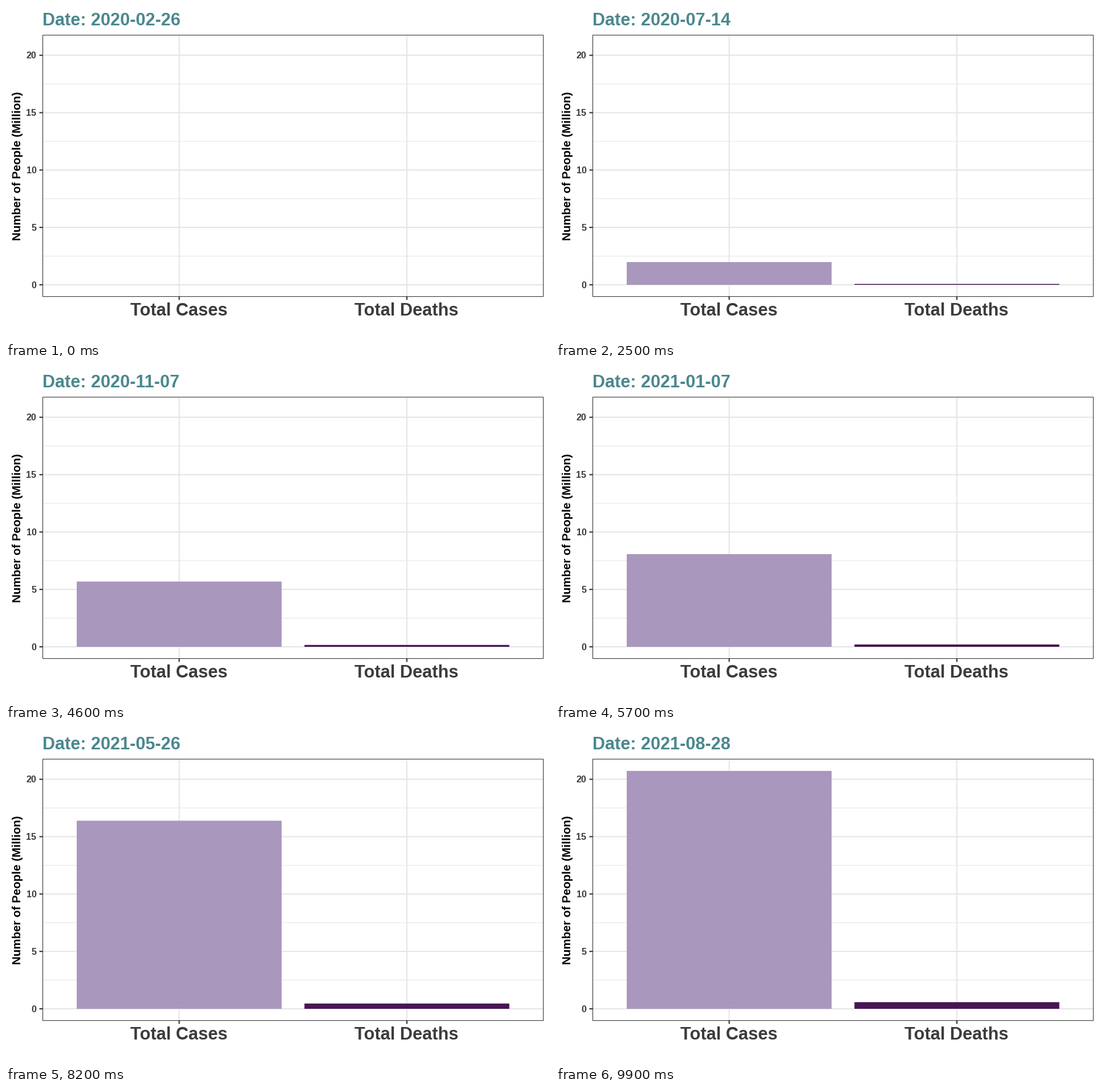
Recreate the animation shown at these times as a matplotlib script. Size 954 px wide and 587 px high, loop 10 s.

```python
import matplotlib.pyplot as plt
import numpy as np
from matplotlib.animation import FuncAnimation
from matplotlib.patches import Rectangle

W, H, DPI = 954, 587, 64
PT = 72 / DPI  # points per pixel
FRAMES, LOOP = 100, 10000

LEFT, RIGHT, TOP, BOTTOM = 64.5, 942.3, 51.2, 510.6
ZERO, UNIT = 490.0, 20.17
CENTERS, BAR_W = (303.7, 703.0), 359.3
GRID, INK, LABEL = "#E6E6E6", "#333333", "#3C3C3C"

START = np.datetime64("2020-02-26")
LAST_DAY = 549
LEAD = 2  # the bars run slightly ahead of the date

# Cases in millions on the 10th, 20th and last day of each month
CASES = [
    0, 0.001, 0.006, 0.020, 0.041, 0.087, 0.163, 0.285, 0.512,
    0.772, 1.068, 1.402, 1.801, 2.119, 2.662, 3.057, 3.502, 3.990,
    4.270, 4.545, 4.811, 5.083, 5.274, 5.536, 5.700, 6.020, 6.336,
    6.782, 7.239, 7.676, 8.115, 8.638, 9.205, 9.659, 10.139, 10.551,
    11.202, 11.950, 12.749, 13.445, 14.043, 14.659, 15.210, 15.894, 16.600,
    17.211, 17.928, 18.557, 19.069, 19.419, 19.930, 20.213, 20.528, 20.806,
]
months = np.arange("2020-03", "2021-09", dtype="datetime64[M]")
first = months.astype("datetime64[D]")
last = (months + 1).astype("datetime64[D]") - 1
CASE_DAYS = (np.stack([first + 9, first + 19, last], 1).ravel() - START).astype(int)

DEATH_DAYS = [20, 45, 64, 89, 110, 140, 170, 189, 230, 270, 310,
              350, 372, 385, 400, 415, 430, 455, 480, 510, 549]
DEATHS = [0, .001, .006, .0245, .043, .073, .107, .125, .153, .168, .196,
          .232, .260, .285, .325, .375, .410, .457, .505, .545, .579]

plt.rcParams["font.family"] = "Liberation Sans"
plt.rcParams["font.weight"] = "bold"

fig = plt.figure(figsize=(W / DPI, H / DPI), dpi=DPI, facecolor="white")
ax = fig.add_axes([0, 0, 1, 1])
ax.set_xlim(0, W)
ax.set_ylim(H, 0)
ax.axis("off")


def line(x0, y0, x1, y1, color, width, z):
    ax.plot([x0, x1], [y0, y1], color=color, lw=width * PT, zorder=z,
            solid_capstyle="butt", snap=False)


def text(x, y, s, size, color, ha="center", **kw):
    return ax.text(x, y, s, fontsize=size * PT, color=color, ha=ha,
                   va="baseline", **kw)


def bar(center, color):
    return ax.add_patch(Rectangle((center - BAR_W / 2, ZERO), BAR_W, 0,
                                  facecolor=color, lw=0, zorder=3, snap=False))


for v in (2.5, 7.5, 12.5, 17.5):
    y = ZERO - v * UNIT
    line(LEFT, y, RIGHT, y, GRID, 1.1, 1)

for v in range(0, 21, 5):
    y = ZERO - v * UNIT
    line(LEFT, y, RIGHT, y, GRID, 2.1, 2)
    line(58.5, y, LEFT, y, INK, 2.1, 4)
    text(53.4, y + 5.8, str(v), 16.1, LABEL, ha="right")

for x, name in zip(CENTERS, ("Total Cases", "Total Deaths")):
    line(x, TOP, x, BOTTOM, GRID, 2.1, 2)
    line(x, BOTTOM, x, 516.5, INK, 2.1, 4)
    text(x - 0.7, 543.8, name, 30.8, LABEL)

ax.add_patch(Rectangle((LEFT, TOP), RIGHT - LEFT, BOTTOM - TOP, fill=False,
                       ec=INK, lw=1.1 * PT, zorder=5, snap=False))
text(25.8, 281, "Number of People (Million)", 20.6, "black",
     rotation=90, rotation_mode="anchor")

title = text(63.6, 34, "", 30.6, "#4B888E", ha="left")
cases = bar(CENTERS[0], "#A997BD")
deaths = bar(CENTERS[1], "#471653")


def update(i):
    day = LAST_DAY * i / (FRAMES - 1)
    t = min(day + LEAD, LAST_DAY)
    title.set_text(f"Date: {START + int(round(day))}")
    cases.set_height(-UNIT * np.interp(t, CASE_DAYS, CASES))
    deaths.set_height(-UNIT * np.interp(t, DEATH_DAYS, DEATHS))
    return title, cases, deaths


anim = FuncAnimation(fig, update, frames=FRAMES, interval=LOOP / FRAMES,
                     repeat=True, repeat_delay=0)
plt.show()
```
